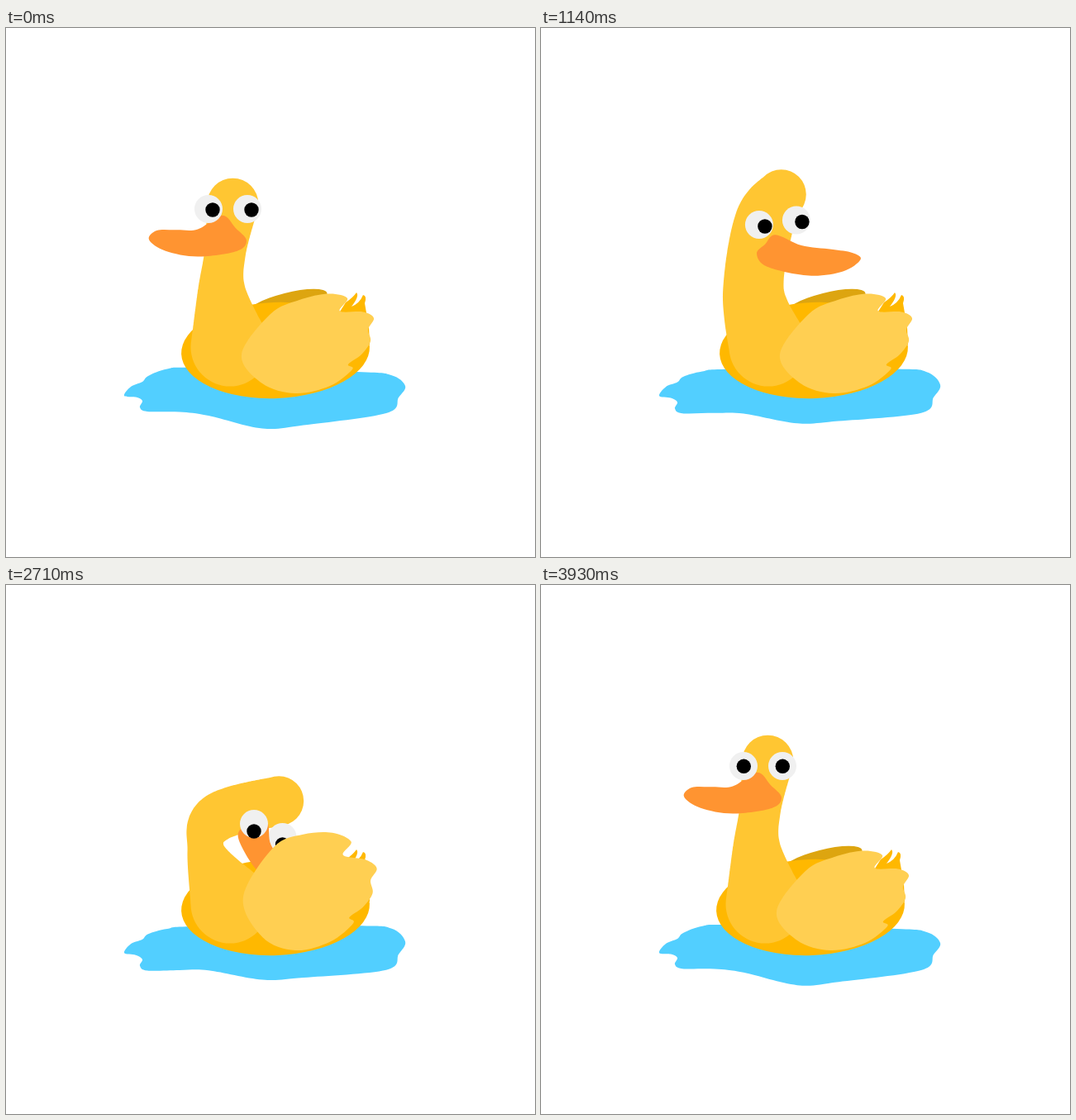
Recreate the animation shown at these times as an HTML page with a canvas. Size 640 px wide and 640 px high, loop 4000 ms.

```html
<!DOCTYPE html>
<html lang="en">
<head>
<meta charset="utf-8">
<title>Duck</title>
<style>
html, body { margin: 0; height: 100%; overflow: hidden; background: #fff; }
canvas { display: block; width: 640px; height: 640px; }
</style>
</head>
<body>
<canvas id="stage" width="640" height="640"></canvas>
<script>
const ctx = document.getElementById('stage').getContext('2d');
const LOOP = 4000;

// spine: neck, throat, head as x, y, radius; beak: root, tip, crest place, crest height,
// tip thickness, depth, lean; eyes: two centres.
const left = {
  spine: [261, 320, 29, 265, 272, 25, 274.5, 212, 31],
  beak: [291, 257, 173, 256, 0.25, 30, 11, 20, 0],
  eyes: [245, 219, 292, 219]
};
const down = {
  spine: [261, 320, 29, 263, 288, 26, 237, 216, 36],
  beak: [262, 277, 147, 288, 0.32, 31, 6, 13, 0],
  eyes: [202.5, 242.5, 246.5, 232.5]
};
const right = {
  spine: [253, 320, 37, 266, 235, 36, 287, 201, 30],
  beak: [257, 273, 383, 280, 0.18, 24, 7.5, 23, 0],
  eyes: [260, 238, 305, 232.5]
};
const preen = {
  spine: [242, 322, 22.5, 256, 281, 29, 331, 261, 30],
  beak: [286, 293, 350, 370, 0.12, 27, 11, 20, 1],
  eyes: [300, 289, 334.5, 305]
};
const base = [271, 386, 47.5];

const waterShape = [[143, 445], [151, 434], [165, 428], [172, 421], [195, 412.5], [230, 411], [424, 416],
  [466, 420], [483, 433], [475, 447], [460, 466], [360, 480.5], [310, 484.5], [245, 469], [210, 464.5],
  [171, 464], [162, 459], [165, 451], [157, 446.5]];
const wingShape = [[285, 395], [320, 346], [355, 329], [390, 321.5], [413, 327], [404, 342.5], [432, 343.5],
  [445, 351], [438, 365], [441, 379], [430, 395], [414, 407], [419, 413], [392, 433], [350, 442], [310, 430]];
const tail = new Path2D('M404 343L411 332Q420 326 424 320Q428 324 418 337Q428 333 432 323' +
  'Q437 324 434 333L439 362L440 383L420 380Z');

const bump = (x, centre, width) => Math.exp(-(((x - centre) / width) ** 2));
const mix = (a, b, k) => a.map((v, i) => v + (b[i] - v) * k);

// Eased value of a list of [time, values] keys.
function track(t, keys) {
  const next = keys.findIndex(key => key[0] > t);
  if (next === 0) return keys[0][1];
  if (next < 0) return keys[keys.length - 1][1];
  const [t0, a] = keys[next - 1], [t1, b] = keys[next];
  const k = (t - t0) / (t1 - t0);
  return mix(a, b, k * k * (3 - 2 * k));
}

const posed = (t, part) => track(t, [
  [30, left], [600, down], [750, down], [1150, right],
  [2400, right], [2680, preen], [2900, preen], [3250, left]
].map(([time, pose]) => [time, pose[part]]));

// Closed smooth curve through the points.
function blob(points, color) {
  const n = points.length;
  const at = i => points[(i + n) % n];
  ctx.beginPath();
  ctx.moveTo(...at(0));
  for (let i = 0; i < n; i++) {
    const [p, a, b, q] = [at(i - 1), at(i), at(i + 1), at(i + 2)];
    ctx.bezierCurveTo(a[0] + (b[0] - p[0]) / 6, a[1] + (b[1] - p[1]) / 6,
      b[0] - (q[0] - a[0]) / 6, b[1] - (q[1] - a[1]) / 6, ...b);
  }
  ctx.fillStyle = color;
  ctx.fill();
}

function oval(x, y, rx, ry, color, tilt = 0) {
  ctx.beginPath();
  ctx.ellipse(x, y, rx, ry, tilt, 0, Math.PI * 2);
  ctx.fillStyle = color;
  ctx.fill();
}

// Tube of overlapping circles along a smooth spine.
function neck(spine) {
  const knots = [base, spine.slice(0, 3), spine.slice(3, 6), spine.slice(6)];
  const knot = i => knots[Math.max(0, Math.min(3, i))];
  ctx.beginPath();
  for (let s = 0; s <= 3; s += 0.02) {
    const i = Math.min(2, Math.floor(s)), u = s - i;
    const [x, y, r] = knot(i).map((b, j) => {
      const a = knot(i - 1)[j], c = knot(i + 1)[j], d = knot(i + 2)[j];
      return b + u / 2 * (c - a + u * (2 * a - 5 * b + 4 * c - d + u * (3 * (b - c) + d - a)));
    });
    ctx.moveTo(x + r, y);
    ctx.arc(x, y, r, 0, Math.PI * 2);
  }
  ctx.fillStyle = '#ffc632';
  ctx.fill();
}

function beak([x0, y0, x1, y1, crest, height, thick, depth, lean]) {
  const place = ([u, v]) => [x0 + (x1 - x0) * u - v * Math.sin(lean), y0 + (y1 - y0) * u + v * Math.cos(lean)];
  blob([
    [0, 0], [crest * 0.45, -height / 2], [crest, -height], [crest + 0.25, -13],
    [0.72, -(thick + 13) / 2], [0.92, -thick], [1, 0],
    [0.83, depth * 0.68], [0.5, depth], [0.1, depth * 0.65]
  ].map(place), '#ff9431');
}

function eye(x, y, look) {
  oval(x, y, 17, 17, '#f0f0f0');
  oval(x + look[0], y + look[1], 8.7, 8.7, '#000');
}

// Raising the wing moves its upper left most and keeps its lower edge still.
const raise = ([x, y], k) => {
  const above = (442 - y) * k;
  return [x + above * 0.04, y - above * (0.36 - 0.0017 * (x - 285))];
};

// The far shore rises and the near shore flattens as the ripple grows.
const ripple = ([x, y], k) => [x, y + k * (y > 446
  ? 6 * bump(x, 190, 32) - 11 * bump(x, 320, 80)
  : 6 * bump(x, 205, 30) - 10 * bump(x, 447, 32))];

function sparkle(t) {
  const [size, angle] = track(t, [[3280, [0, 15]], [3420, [1, -16]], [3680, [1, -90]], [3880, [0, -130]]]);
  if (size <= 0) return;
  ctx.save();
  ctx.translate(312, 362);
  ctx.rotate(angle * Math.PI / 180);
  ctx.scale(size, size);
  ctx.fillStyle = '#fff';
  for (const [w, h] of [[23.5, 0.9], [0.9, 17]]) {
    ctx.beginPath();
    ctx.moveTo(-w, 0);
    ctx.lineTo(0, -h);
    ctx.lineTo(w, 0);
    ctx.lineTo(0, h);
    ctx.fill();
  }
  ctx.restore();
}

function draw(t) {
  ctx.fillStyle = '#fff';
  ctx.fillRect(0, 0, 640, 640);
  const swell = 1 - Math.abs(t / 2000 - 1);
  blob(waterShape.map(p => ripple(p, swell)), '#52cfff');

  const [sway] = track(t, [[0, [0]], [1140, [4]], [1700, [0]], [2330, [4]], [2400, [4]], [2690, [0]]]);
  const look = track(t, [
    [30, [5, 1]], [500, [-4, 7.5]], [750, [-4, 7.5]], [1150, [7, 2]], [1720, [7, 2]],
    [2300, [7, 6]], [2400, [7, 6]], [2680, [0, 9]], [2900, [0, 9]], [3250, [0.3, 0.3]]
  ]);
  const [lift] = track(t, [[2400, [0]], [2680, [1]], [2900, [1]], [3250, [0]]]);
  const [lx, ly, rx, ry] = posed(t, 'eyes');

  ctx.save();
  ctx.translate(sway, 0);
  oval(340, 333, 50, 12.5, '#dda510', -0.25);
  oval(326, 390, 114, 58, '#ffb800', -0.04);
  ctx.fill(tail);
  neck(posed(t, 'spine'));
  eye(rx, ry, look);
  beak(posed(t, 'beak'));
  eye(lx, ly, look);
  blob(wingShape.map(p => raise(p, lift)), '#ffcf52');
  ctx.restore();
  sparkle(t);
}

const start = performance.now();
function frame() {
  draw((performance.now() - start) % LOOP);
  requestAnimationFrame(frame);
}
frame();
</script>
</body>
</html>
```
